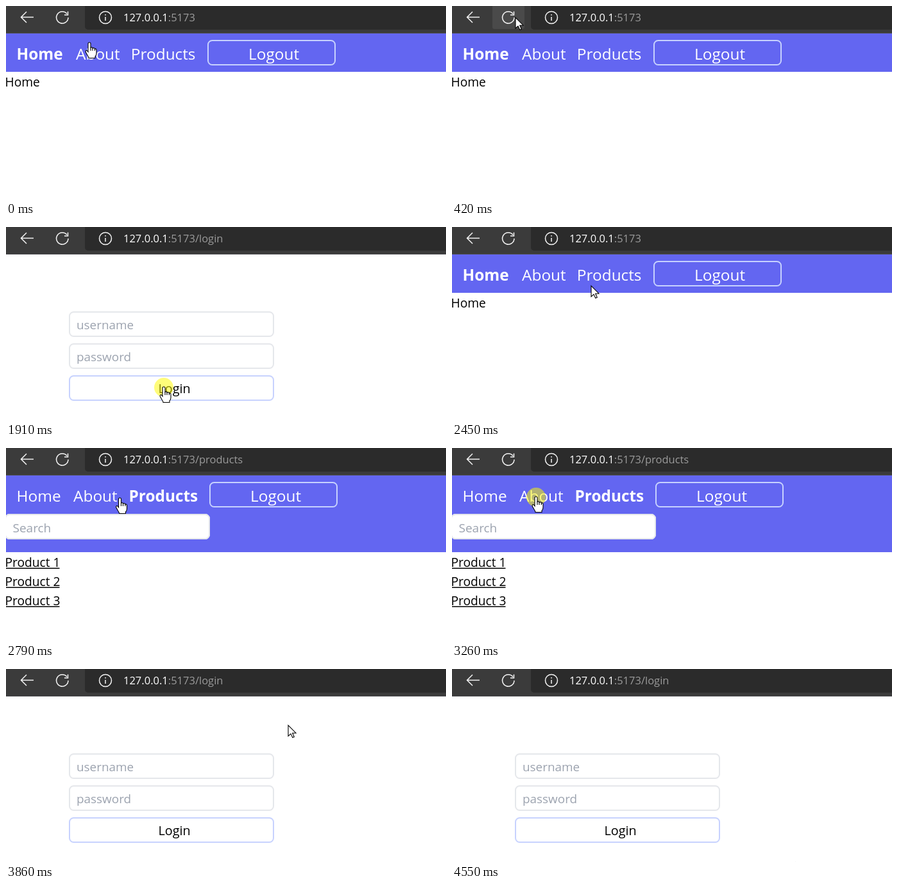
An HTML page with a canvas that plays this animation: 686x302 px, repeating every 4620 ms.

```html
<!DOCTYPE html>
<html lang="en">
<head>
<meta charset="utf-8">
<title>Login flow</title>
<style>
html, body { margin: 0; width: 100%; height: 100%; overflow: hidden; background: #fff; }
canvas { display: block; }
</style>
</head>
<body>
<canvas id="stage" width="686" height="302"></canvas>
<script>
const ctx = document.getElementById('stage').getContext('2d');
const LOOP = 4620, STEP = 67;

// [start ms, page]
const pages = [[0, 'home'], [750, 'login'], [2050, 'home'], [2720, 'products'], [3330, 'about'], [3860, 'login']];
// [start ms, steps, x, y]: the pointer advances once per STEP
const moves = [
  [70, 3, 99, 18], [1340, 8, 246, 250], [2111, 6, 217, 92], [2517, 1, 217, 80],
  [2720, 4, 138, 76], [3000, 1, 131, 76], [3380, 5, 440, 88], [4060, 8, 536, 303]
];
// [from ms, to ms]
const clicks = [[280, 420], [1910, 2044], [2590, 2720], [3190, 3330], [3720, 3860]];

const arrow = new Path2D('M0 0V17L4 13.3L6.8 19.3L9.3 18.2L6.7 12.2H12Z');
const hand = new Path2D('M-2 2Q-2 0 0 0Q2 0 2 2V8Q4.5 7 5 9Q7.7 8 8.4 10Q11 9.5 11 12V17Q11 20 9 22V24.5H-1Q-1 23 -3 20L-5.8 15Q-6 12 -4 12.5L-2 15Z');
const knuckles = new Path2D('M2 8V13M5 9V13M8.4 10V13');
const icons = new Path2D('M43 17.5H23.5M32 9L23.5 17.5L32 26M97 18A9.2 9.2 0 1 1 95 12.2M96.5 8.5V14H91M164.5 18A9.5 9.5 0 1 1 145.5 18A9.5 9.5 0 1 1 164.5 18M155 17V23M155 13V14.8');

function rect(x, y, w, h, color) {
  ctx.fillStyle = color;
  ctx.fillRect(x, y, w, h);
}

function rounded(x, y, w, h, radius, color) {
  ctx.fillStyle = color;
  ctx.beginPath();
  ctx.roundRect(x, y, w, h, radius);
  ctx.fill();
}

function outline(x, y, w, h, color) {
  ctx.strokeStyle = color;
  ctx.lineWidth = 2;
  ctx.beginPath();
  ctx.roundRect(x + 1, y + 1, w - 2, h - 2, 6.5);
  ctx.stroke();
}

function text(str, x, y, size, color, weight = 400) {
  ctx.font = `${weight} ${size}px "Open Sans", "Noto Sans", sans-serif`;
  ctx.fillStyle = color;
  ctx.fillText(str, x, y);
  return x + ctx.measureText(str).width;
}

function drawBrowser(page, hover) {
  rect(0, 0, 686, 42, '#3b3b3b');
  rect(0, 42, 686, 1, '#4d4d50');
  if (hover) rounded(63, -4, 50, 40, 3, '#4a4a4a');
  rounded(123, -6, 570, 43, 5, '#2b2b2b');
  ctx.strokeStyle = '#f4f4f4';
  ctx.lineWidth = 1.5;
  ctx.stroke(icons);
  const end = text('127.0.0.1', 183, 24, 16.5, '#fff');
  text(':5173' + (page === 'home' ? '' : '/' + page), end, 24, 16.5, '#9b9b9b');
}

function drawLogin() {
  ['username', 'password'].forEach((label, i) => {
    outline(98, 132 + i * 50, 320, 40, '#e5e7eb');
    text(label, 110, 160 + i * 50, 18.9, '#9ca3af');
  });
  outline(98, 232, 320, 40, '#c7d2fe');
  text('Login', 237.5, 260, 19.8, '#000');
}

function drawSite(page) {
  const listing = page === 'products';
  rect(0, 43, 686, listing ? 120 : 60, '#6366f1');
  const [aboutX, productsX, logoutX] = {
    home: [109, 194.8, 314], products: [105, 191.5, 317], about: [105, 196.5, 315]
  }[page];
  const link = (name, x) => text(name, x, 84, 24.4, '#fff', name.toLowerCase() === page ? 700 : 400);
  link('Home', 16.5);
  link('About', aboutX);
  link('Products', productsX);
  outline(logoutX, 53, 200, 40, '#c7d2fe');
  link('Logout', logoutX + 64);

  if (!listing) {
    text(page === 'home' ? 'Home' : 'About', -1.5, 126, 19.2, '#000');
    return;
  }
  rounded(-2, 103, 320, 40, 7.5, '#fff');
  outline(-2, 103, 320, 40, '#e5e7eb');
  text('Search', 10.5, 132, 19, '#9ca3af');
  for (let i = 0; i < 3; i++) {
    const y = 186 + i * 30;
    text('Product ' + (i + 1), -1.5, y, 19.2, '#000');
    rect(0, y + 1.5, 83.5, 1.5, '#000');
  }
}

function pointerAt(t) {
  let x = 130, y = 57;
  for (const [start, steps, toX, toY] of moves) {
    if (t < start) break;
    const u = Math.min(1, (Math.floor((t - start) / STEP) + 1) / steps);
    const e = u * u * (3 - 2 * u);
    x += (toX - x) * e;
    y += (toY - y) * e;
  }
  return [x, y];
}

function drawPointer(x, y, overLink, pressed) {
  if (pressed) {
    ctx.fillStyle = 'rgba(255, 250, 0, .52)';
    ctx.beginPath();
    ctx.arc(x, y + 1, 15, 0, 7);
    ctx.fill();
  }
  const shape = overLink ? hand : arrow;
  ctx.save();
  ctx.translate(x, y);
  ctx.fillStyle = '#fff';
  ctx.strokeStyle = '#000';
  ctx.lineWidth = 1.1;
  ctx.fill(shape);
  ctx.stroke(shape);
  if (overLink) ctx.stroke(knuckles);
  ctx.restore();
}

function draw(now) {
  const t = now % LOOP;
  const page = pages.findLast(([start]) => t >= start)[1];
  const [x, y] = pointerAt(t);
  const onLogin = page === 'login';
  const overLink = onLogin
    ? y > 232 && y < 272 && x > 98 && x < 418
    : y > 50 && y < 91 && x < 516;
  const pressed = clicks.some(([from, to]) => t >= from && t < to);

  rect(0, 0, 686, 302, '#fff');
  drawBrowser(page, x > 63 && x < 113 && y < 36);
  if (onLogin) drawLogin();
  else drawSite(page);
  drawPointer(x, y, overLink, pressed);
}

const begin = performance.now();
function tick() {
  draw(performance.now() - begin);
  requestAnimationFrame(tick);
}
tick();
</script>
</body>
</html>
```
